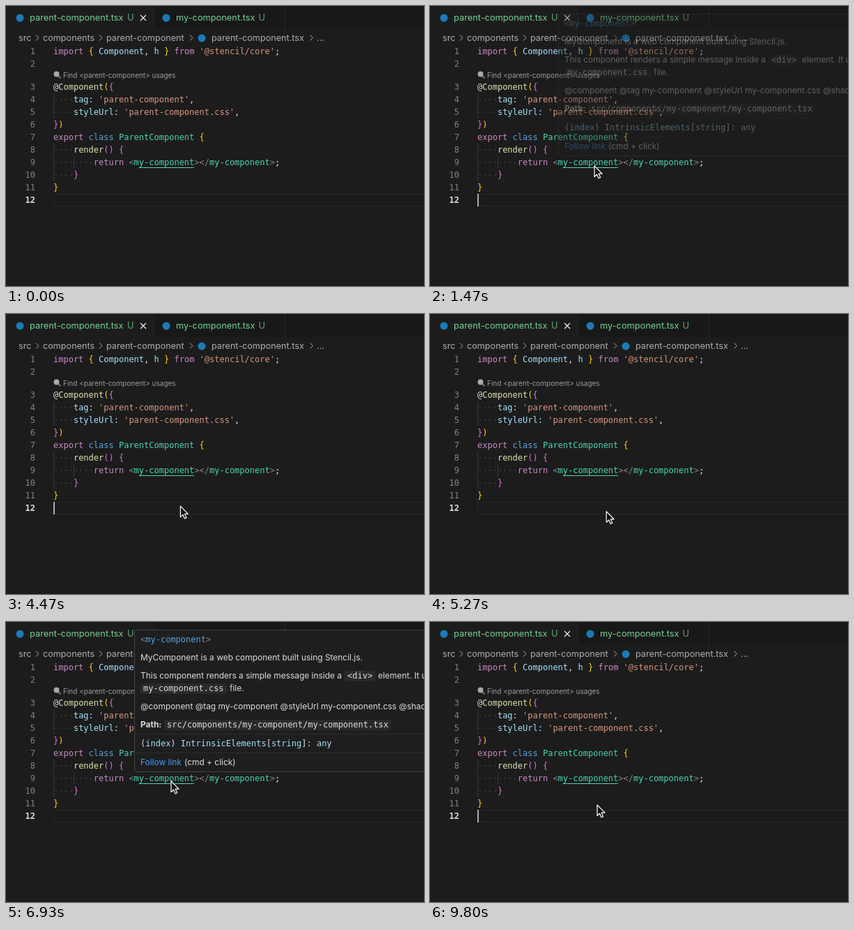
Write an HTML page that moves like this. It is 600x401 px and loops after 9.87 s.

```html
<!DOCTYPE html>
<html lang="en">
<head>
<meta charset="utf-8">
<title>Component hover</title>
<style>
  html, body { margin: 0; width: 100%; height: 100%; overflow: hidden; background: #1c1c1c; }
  svg { display: block; width: 100vw; height: 100vh; }
  text { white-space: pre; }
  .code { font: 12px "DejaVu Sans Mono", "Liberation Mono", monospace; }
  .tab { font: 12.8px Inter, "Open Sans", sans-serif; }
  .ui { font: 12.65px Inter, "Open Sans", sans-serif; }
  .doc { font: 11.93px Inter, "Open Sans", sans-serif; }
  .lens { font: 10px Inter, "Open Sans", sans-serif; }
  text.bold { font-weight: bold; }
</style>
</head>
<body>
<svg id="stage" viewBox="0 0 600 401" xmlns="http://www.w3.org/2000/svg"></svg>
<script>
const LOOP = 9870, FRAME = 1000 / 15;
const C = {
  bg: '#1c1c1c', strip: '#181818', edge: '#262626', fg: '#dedede', doc: '#dcdcdc', dim: '#adadad',
  key: '#cc88c6', blue: '#58a2e0', name: '#a2e1ff', str: '#d8977c', fn: '#e4e4b0',
  type: '#48d6b2', gold: '#ffd710', orchid: '#de70da', gray: '#858585',
  dot: '#404040', git: '#73d294', chip: '#2a2a2a', line: '#424242', rule: '#2c2c2c'
};

const esc = s => s.replace(/&/g, '&amp;').replace(/</g, '&lt;').replace(/>/g, '&gt;');
const rect = (x, y, w, h, fill, more = '') =>
  `<rect x="${x}" y="${y}" width="${w}" height="${h}" fill="${fill}" ${more}/>`;
const path = (d, stroke, width = 1) =>
  `<path d="${d}" fill="none" stroke="${stroke}" stroke-width="${width}"/>`;
const text = (cls, x, y, s, fill, more = '') =>
  `<text class="${cls}" x="${x}" y="${y}" fill="${fill}" ${more}>${esc(s)}</text>`;
const disc = (x, y) => `<circle cx="${x}" cy="${y}" r="5.5" fill="#1b7ab8"/>`;

// Alternating colour name and string
function code(x, y, ...runs) {
  let spans = '';
  for (let i = 0; i < runs.length; i += 2)
    spans += `<tspan fill="${C[runs[i]]}">${esc(runs[i + 1])}</tspan>`;
  return `<text class="code" x="${x}" y="${y}">${spans}</text>`;
}

const rowY = n => n < 3 ? 51 + 18 * n : 66 + 18 * n;
const pad = '····';
const rows = {
  1: ['key', 'import', 'gold', ' { ', 'name', 'Component', 'fg', ', ', 'name', 'h', 'gold', ' } ',
      'key', 'from ', 'str', "'@stencil/core'", 'fg', ';'],
  3: ['fg', '@', 'fn', 'Component', 'gold', '(', 'orchid', '{'],
  4: ['dot', pad, 'name', 'tag: ', 'str', "'parent-component'", 'fg', ','],
  5: ['dot', pad, 'name', 'styleUrl: ', 'str', "'parent-component.css'", 'fg', ','],
  6: ['orchid', '}', 'gold', ')'],
  7: ['key', 'export ', 'blue', 'class ', 'type', 'ParentComponent ', 'gold', '{'],
  8: ['dot', pad, 'fn', 'render', 'orchid', '() {'],
  9: ['dot', pad + pad, 'key', 'return ', 'gray', '<', 'type', 'my-component', 'gray', '></',
      'type', 'my-component', 'gray', '>', 'fg', ';'],
  10: ['dot', pad, 'orchid', '}'],
  11: ['gold', '}']
};

function tabs() {
  const chevron = x => path(`M${x - 2} 41.5l4 4l-4 4`, C.dim);
  const crumb = (x, s) => text('ui', x, 50, s, C.dim);
  const tab = (x, s, end) => disc(x - 14, 17) + text('tab', x, 21, s, C.git) +
    text('tab', end, 21, 'U', C.git, 'opacity=".75"');
  return rect(212, 0, 388, 33, C.strip) +
    path('M212.5 0V33M400.5 0V33', C.edge) +
    tab(34, 'parent-component.tsx', 174) + tab(244, 'my-component.tsx', 362.5) +
    path('M193 13l8 8M201 13l-8 8', '#f0f0f0', 1.2) +
    crumb(18, 'src') + chevron(45) + crumb(53, 'components') + chevron(136) +
    crumb(144, 'parent-component') + chevron(266) + disc(281, 46) +
    crumb(295, 'parent-component.tsx') + chevron(438.5) + crumb(446, '...');
}

function editor() {
  let out = path('M600 269.5H68.5V286.5H600', '#272727') +
    path('M68.5 125V161M68.5 197V251M97.5 215V233', '#383838');
  for (let n = 1; n <= 12; n++) {
    const now = n === 12;
    out += text(now ? 'code bold' : 'code', 42, rowY(n), String(n), now ? '#dcdcdc' : '#828282',
      'text-anchor="end"');
    if (rows[n]) out += code(68, rowY(n), ...rows[n]);
  }
  return out + path('M191 231.5H270', C.type) +
    path('M74.5 99.5l4 4', '#777', 1.8) + '<circle cx="72.5" cy="97.5" r="4" fill="#a8a8a8"/>' +
    text('lens', 82, 103, 'Find <parent-component> usages', '#9c9c9c') +
    rect(68, 269, 2, 18, '#aeafad', 'id="caret"');
}

function hover() {
  const doc = (x, y, s, fill = C.doc, cls = 'doc') => text(cls, x, y, s, fill);
  const chip = (x, y, w) => rect(x, y, w, 15, C.chip, 'rx="2"');
  return '<g id="hover">' +
    rect(184.5, 11.5, 430, 203, '#1e1e1e', `rx="2" stroke="${C.line}"`) +
    path('M185 160.5H600M185 187.5H600', C.rule) +
    code(193, 29, 'gray', '<', 'blue', 'my-component', 'gray', '>') +
    doc(193, 55, 'MyComponent is a web component built using Stencil.js.') +
    doc(193, 81, 'This component renders a simple message inside a') +
    chip(486, 70, 44) + code(490, 81, 'fg', '<div>') + doc(534, 81, 'element. It uses') +
    chip(193, 88, 124) + code(197, 99, 'fg', 'my-component.css') + doc(321, 99, 'file.') +
    doc(193, 125, '@component @tag my-component @styleUrl my-component.css @shadow') +
    doc(193, 151, 'Path:', C.doc, 'doc bold') +
    chip(227, 140, 325) + code(231, 151, 'fg', 'src/components/my-component/my-component.tsx') +
    code(193, 178, 'fg', '(', 'name', 'index', 'fg', ') ', 'name', 'IntrinsicElements',
      'fg', '[', 'name', 'string', 'fg', ']: ', 'name', 'any') +
    doc(193, 205, 'Follow link', '#3f9cff') + doc(256, 205, '(cmd + click)') + '</g>';
}

const pointer = '<path id="mouse" d="M0 0V15.5L3.6 12.2L6 17.8L8.6 16.7L6.2 11.2H11Z" ' +
  'fill="#111" stroke="#fff" stroke-width="1.2" stroke-linejoin="round"/>';

document.getElementById('stage').innerHTML =
  rect(0, 0, 600, 401, C.bg) + tabs() + editor() + hover() + pointer;
const [caret, popup, mouse] =
  ['caret', 'hover', 'mouse'].map(id => document.getElementById(id));

// Pointer stops: time, x, y
const stops = [
  [330, 312, 306], [1270, 236, 230], [1330, 236, 229], [4130, 236, 229],
  [4730, 260, 306], [4930, 260, 306], [5870, 237, 228], [9270, 237, 228], [9800, 240, 262]
];
const shows = [[1435, 4330], [6235, 9470]];

function pointerAt(t) {
  const i = stops.findIndex(s => s[0] >= t);
  if (i < 0) return stops[stops.length - 1].slice(1);
  if (i === 0) return stops[0].slice(1);
  const [t0, x0, y0] = stops[i - 1], [t1, x1, y1] = stops[i];
  const u = (t - t0) / (t1 - t0), e = u * u * (3 - 2 * u);
  return [x0 + (x1 - x0) * e, y0 + (y1 - y0) * e];
}

function draw(ms) {
  const t = Math.round(Math.floor((ms % LOOP + 4) / FRAME) * FRAME / 10) * 10;
  const span = shows.find(([from, to]) => t >= from && t < to);
  popup.setAttribute('opacity', span ? Math.min(1, (t - span[0]) / 100) : 0);

  const beat = t % 1000;
  caret.style.display = beat >= 470 && beat < 930 ? '' : 'none';

  const [x, y] = pointerAt(t);
  mouse.style.display = t >= 330 ? '' : 'none';
  mouse.setAttribute('transform', `translate(${x.toFixed(2)} ${y.toFixed(2)})`);
}

const start = performance.now();
function tick() {
  draw(performance.now() - start);
  requestAnimationFrame(tick);
}
tick();
</script>
</body>
</html>
```
